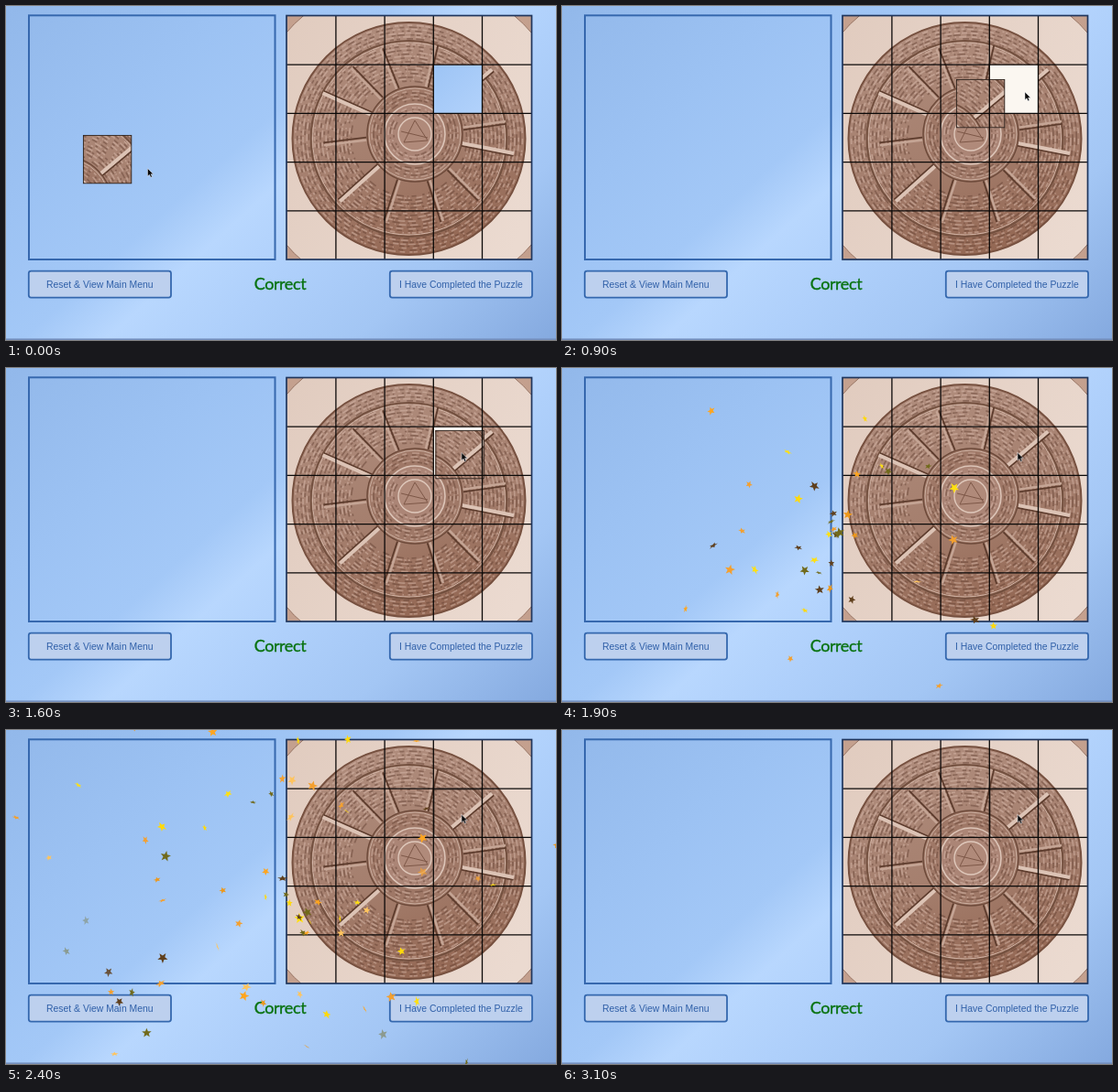
An HTML page that plays this animation: 600x365 px, repeating every 3200 ms.

```html
<!DOCTYPE html>
<html lang="en">
<head>
<meta charset="utf-8">
<title>Jigsaw puzzle</title>
<style>
  html, body { margin: 0; width: 100%; height: 100%; overflow: hidden; }
  svg { display: block; width: 600px; height: 365px; }
  .label { font: 10.42px "Liberation Sans", Arial, sans-serif; fill: #2f5fa8; }
  .button { fill: #bdd0ee; stroke: #3568ae; stroke-width: 1.8; }
  .result { font: 18px Lato, "Open Sans", sans-serif; letter-spacing: -.4px;
            fill: #08720f; stroke: #08720f; stroke-width: .35; }
</style>
</head>
<body>
<svg id="stage" viewBox="0 0 600 365">
  <defs>
    <linearGradient id="sky" gradientUnits="userSpaceOnUse" x1="0" y1="0" x2="451" y2="500">
      <stop offset="0" stop-color="#92b8ea"/>
      <stop offset=".25" stop-color="#9cc2f3"/>
      <stop offset=".42" stop-color="#a3c8f7"/>
      <stop offset=".51" stop-color="#b8d7fe"/>
      <stop offset=".62" stop-color="#afd0fb"/>
      <stop offset=".78" stop-color="#a3c6f4"/>
      <stop offset="1" stop-color="#84a9df"/>
    </linearGradient>
    <linearGradient id="hole" x2="1" y2="1">
      <stop offset="0" stop-color="#9dc4f5"/>
      <stop offset="1" stop-color="#b2d2fb"/>
    </linearGradient>
    <linearGradient id="stone" x2="1" y2=".4">
      <stop offset="0" stop-color="#dfc9bc"/>
      <stop offset="1" stop-color="#ebdad0"/>
    </linearGradient>
    <linearGradient id="bronze" x1=".3" x2=".6" y2="1">
      <stop offset="0" stop-color="#b08d7d"/>
      <stop offset=".55" stop-color="#a57f6e"/>
      <stop offset="1" stop-color="#936753"/>
    </linearGradient>
    <clipPath id="boardClip"><rect x="306" y="10.5" width="267.5" height="266.5"/></clipPath>
    <clipPath id="cellClip"><rect x="466.5" y="64.5" width="53" height="53"/></clipPath>
  </defs>

  <rect width="600" height="365" fill="url(#sky)"/>
  <rect y="363.4" width="600" height="1.6" fill="#748fbd"/>
  <rect x="25" y="10.3" width="268.5" height="266.7" fill="none" stroke="#3668ae" stroke-width="2"/>

  <g clip-path="url(#boardClip)"><g id="photo"></g></g>
  <rect id="slot" x="466.5" y="64.5" width="53" height="53"/>
  <g id="piece">
    <use href="#photo" clip-path="url(#cellClip)"/>
    <rect x="466.9" y="64.9" width="52.4" height="52.4" fill="none" stroke="#2c211c" stroke-width=".9"/>
  </g>
  <path id="grid" stroke="#0b0908" stroke-width="1.3"/>
  <rect x="306" y="10.5" width="267.5" height="266.5" fill="none" stroke="#1f355c" stroke-width="1.7"/>

  <rect class="button" x="24.8" y="289.6" width="155.2" height="29" rx="2.5"/>
  <text class="label" x="44" y="307.6">Reset &amp; View Main Menu</text>
  <rect class="button" x="418.8" y="289.6" width="155.2" height="29" rx="2.5"/>
  <text class="label" x="429" y="307.6">I Have Completed the Puzzle</text>
  <text class="result" x="270.7" y="310">Correct</text>

  <g id="confetti"></g>
  <path id="cursor" d="M0 0V8.6L2 6.8 3.4 9.8 4.9 9.1 3.6 6.2H6.2Z" fill="#080808" stroke="#e8edf5" stroke-width=".5"/>
</svg>

<script>
const LOOP = 3200, STEP = 100;
const byId = id => document.getElementById(id);

function add(parent, tag, attributes) {
  const node = document.createElementNS("http://www.w3.org/2000/svg", tag);
  for (const key in attributes) node.setAttribute(key, attributes[key]);
  parent.appendChild(node);
  return node;
}

function seeded(seed) {
  return () => (seed = (seed * 16807) % 2147483647) / 2147483647;
}

// Position along [time, x, y] keys.
function along(keys, t) {
  const next = keys.findIndex(key => key[0] > t);
  if (next < 0) return keys[keys.length - 1].slice(1);
  const [t0, x0, y0] = keys[next - 1], [t1, x1, y1] = keys[next];
  const p = (t - t0) / (t1 - t0);
  return [x0 + (x1 - x0) * p, y0 + (y1 - y0) * p];
}

function drawPhoto() {
  const photo = byId("photo"), hub = { x: 446, y: 140 }, disc = { x: 439.5, y: 145 };
  const random = seeded(41);
  const ring = (center, r, fill, stroke = "none", width = 1, dash = "none") =>
    add(photo, "circle", { cx: center.x, cy: center.y, r, fill, stroke, "stroke-width": width, "stroke-dasharray": dash });
  const relief = (center, from, to, gap) => {
    const dashes = () => Array.from({ length: 18 }, () => (1 + random() * 8).toFixed(1)).join(" ");
    for (let r = from; r <= to; r += gap) {
      ring(center, r, "none", "#5f3d2e70", gap * .4, dashes());
      ring(center, r + gap / 2, "none", "#dcc0b270", gap * .4, dashes());
    }
  };

  add(photo, "rect", { x: 305, y: 9, width: 270, height: 270, fill: "#c4a08e" });
  ring(disc, 177, "url(#stone)", "#94705f", 1);
  ring(disc, 127, "url(#bronze)", "#76503f", 2);
  relief(disc, 63, 122, 4.2);
  ring(disc, 107, "none", "#73503f", 2);
  ring(disc, 105, "none", "#d3b6a7", 1);

  for (const angle of [-40, -8, 11, 45, 72, 108, 138, 173, 204, 226, 248, 283]) {
    const bright = [-40, 11, 138, 204].includes(angle);
    const spoke = (offset, stroke, width) => add(photo, "path", {
      d: `M${bright ? 44 : 53} ${offset}H${bright ? 110 : 100}`, stroke, "stroke-width": width,
      transform: `translate(${hub.x} ${hub.y}) rotate(${angle})`
    });
    spoke(2.8, "#5d3c2d", 1.8);
    spoke(0, bright ? "#dcc3b5" : "#c5a595", bright ? 4 : 2.5);
  }

  ring(hub, 52, "#9f7867", "#6d4a3a", 1.5);
  relief(hub, 37, 48, 4);
  ring(hub, 50, "none", "#cbafa0", 1);
  ring(hub, 33, "#ab8576", "#dcc4b7", 1.6);
  relief(hub, 23, 30, 4);
  ring(hub, 18, "#b08a7a", "#dfc8bb", 1.4);
  add(photo, "path", { d: "M434 149L446 125 460 147Z M431 137L460 144", fill: "none", stroke: "#7d5747" });
}

function drawGrid() {
  let d = "";
  for (let i = 1; i < 5; i++) {
    const line = i * 53.2;
    d += `M${306.7 + line} 11V277M306 ${11 + line}H573`;
  }
  byId("grid").setAttribute("d", d);
}

function makeConfetti() {
  const random = seeded(977);
  const colors = ["#ffe012", "#ffd90a", "#ffa51f", "#ed981b", "#f3a030", "#5f3f1c", "#716a1b", "#ffc45e"];
  let d = "";
  for (let i = 0; i < 10; i++) {
    const r = i % 2 ? 2.5 : 5.8, a = i * Math.PI / 5 - Math.PI / 2;
    d += `${i ? "L" : "M"}${(r * Math.cos(a)).toFixed(2)} ${(r * Math.sin(a)).toFixed(2)}`;
  }
  return Array.from({ length: 150 }, () => ({
    node: add(byId("confetti"), "path", { d: d + "Z", fill: colors[Math.floor(random() * colors.length)] }),
    birth: 1650 + random() * 900,
    life: 450 + random() * 80,
    angle: random() * 2 * Math.PI,
    reach: 140 + random() * 200,
    size: .65 + random() * .4,
    turn: random() * 360,
    spin: (random() - .5) * 500,
    tilt: random() * 6.3
  }));
}

function drawStar(star, t) {
  const p = (t - star.birth) / star.life;
  const alive = p > 0 && p < 1;
  star.node.setAttribute("visibility", alive ? "visible" : "hidden");
  if (!alive) return;
  const distance = star.reach * p * (1.6 - .6 * p);
  const x = 300 + distance * Math.cos(star.angle);
  const y = 182 + distance * Math.sin(star.angle) + 14 * p * p;
  const flat = .12 + .88 * Math.abs(Math.cos(star.tilt + p * 5));
  star.node.setAttribute("transform",
    `translate(${x} ${y}) rotate(${star.turn + star.spin * p}) scale(${star.size} ${star.size * flat})`);
  star.node.setAttribute("opacity", Math.min(1, (1 - p) * 10));
}

const cursorPath = [
  [0, 154.5, 177.5], [100, 130, 170], [200, 130, 170], [300, 108, 165], [500, 108, 165],
  [600, 200, 140], [700, 357.5, 103], [800, 470, 97], [900, 505, 94],
  [1200, 507.5, 93.5], [1400, 503, 93.5], [1500, 497, 92.5]
];
const piecePath = [
  [0, 84, 141], [500, 84, 141], [600, 101, 136], [700, 150, 121.7], [800, 300, 100],
  [900, 430, 80], [1000, 480, 71], [1200, 487.3, 70], [1400, 477, 69],
  [1500, 468.5, 68], [1600, 468.5, 68], [1700, 466.5, 64.5]
];

drawPhoto();
drawGrid();
const stars = makeConfetti();

function render(time) {
  const t = Math.floor((time % LOOP) / STEP) * STEP;
  const [cx, cy] = along(cursorPath, t), [px, py] = along(piecePath, t);
  byId("cursor").setAttribute("transform", `translate(${cx} ${cy})`);
  byId("piece").setAttribute("transform", `translate(${px - 466.5} ${py - 64.5})`);
  byId("slot").setAttribute("fill", t < 800 ? "url(#hole)" : "#fbf7f1");
  stars.forEach(star => drawStar(star, t));
}

const start = performance.now();
function tick() {
  render(performance.now() - start);
  requestAnimationFrame(tick);
}
tick();
</script>
</body>
</html>
```
